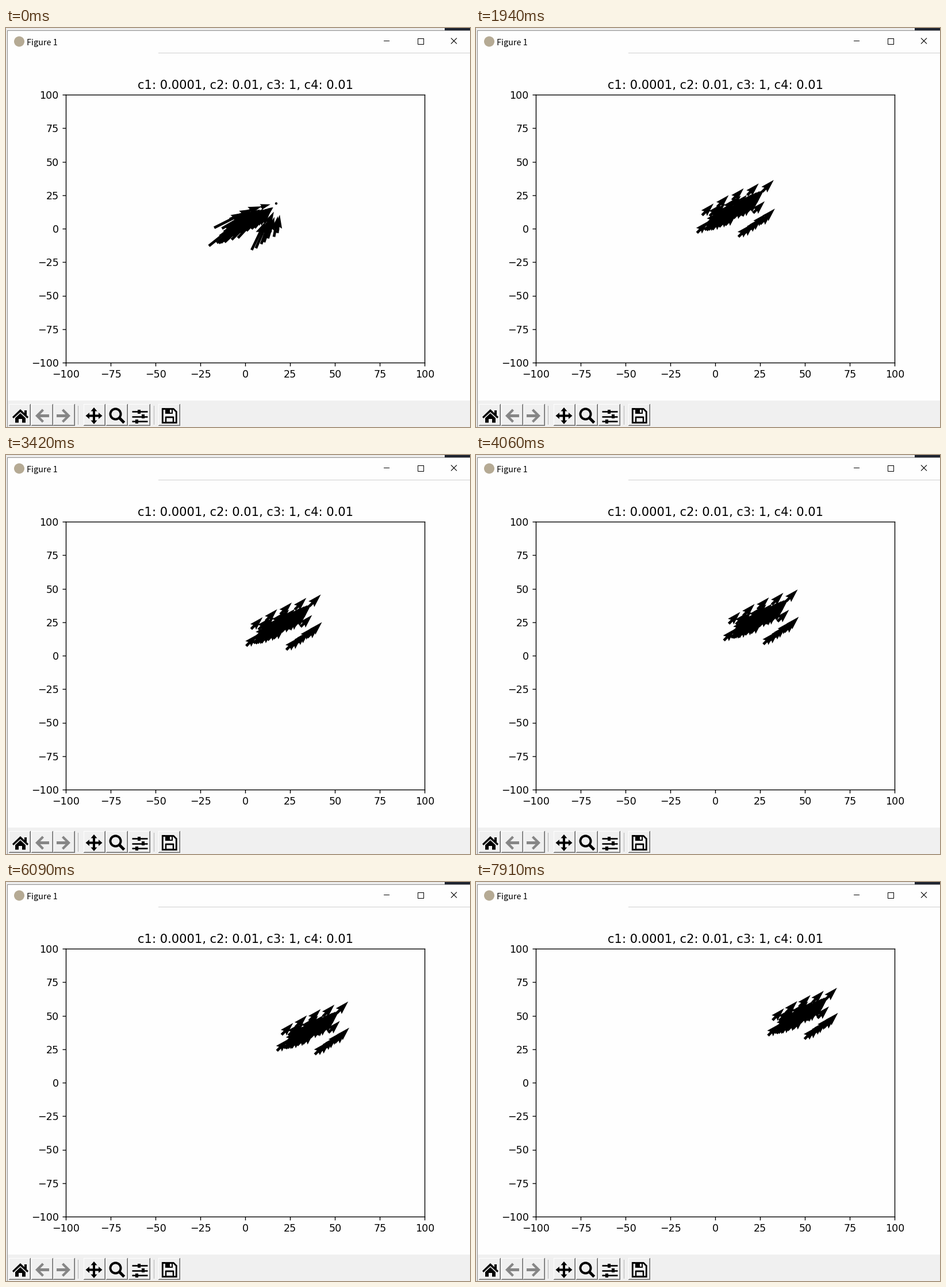
Write a matplotlib script that moves like this. It is 807 by 694 pixels and loops after 8000 ms.

```python
import numpy as np
import matplotlib.pyplot as plt
from matplotlib.animation import FuncAnimation
from matplotlib.patches import Circle, Polygon, Rectangle

W, H, DPI = 807, 694, 128
PT = 72 / DPI            # points per pixel
UI = 126 / DPI           # plot text and line scale
LOOP, INTERVAL = 8000, 50
STEP_MS = 163.5          # time one simulation step stays on screen

plt.rcParams.update({
    "font.family": "DejaVu Sans",
    "font.size": 10 * UI,
    "axes.linewidth": 0.8 * UI,
    "xtick.major.size": 3.5 * UI, "ytick.major.size": 3.5 * UI,
    "xtick.major.width": 0.8 * UI, "ytick.major.width": 0.8 * UI,
    "xtick.major.pad": 3.5 * UI, "ytick.major.pad": 3.5 * UI,
})

fig = plt.figure(figsize=(W / DPI, H / DPI), dpi=DPI, facecolor="#fefefe")
px = fig.add_axes([0, 0, 1, 1])
px.set(xlim=(0, W), ylim=(H, 0), autoscale_on=False)
px.axis("off")


def rect(x0, y0, x1, y1, color):
    px.add_patch(Rectangle((x0, y0), x1 - x0, y1 - y0, fc=color, lw=0))


def poly(points, color="black"):
    px.add_patch(Polygon(points, fc=color, lw=0))


def line(xs, ys, width=1.0, color="black"):
    px.plot(xs, ys, color=color, lw=width * PT, solid_capstyle="butt",
            solid_joinstyle="miter")


def box(x0, y0, x1, y1, width):
    line([x0, x1, x1, x0, x0, x1], [y0, y0, y1, y1, y0, y0], width)


def button(right):
    """Raised tool button that ends at the given x."""
    x0, x1, y0, y1 = right - 38, right, 654, 692
    rect(x0, y0, x1, y1, "#696969")
    rect(x0, y0, x1 - 1, y1 - 1, "#ffffff")
    rect(x0 + 1, y0 + 1, x1 - 1, y1 - 1, "#a0a0a0")
    rect(x0 + 1, y0 + 1, x1 - 2, y1 - 2, "#f0f0f0")


def draw_window():
    rect(0, 0, W, 4, "#ececec")
    rect(763, 0, W, 4, "#1f2430")
    rect(0, 0, 2, H, "#ececec")
    rect(2, 4, W, 5, "#8a8a8a")
    rect(2, 4, 3, H, "#8a8a8a")
    rect(265, 43, W, 44, "#cfcfcf")
    px.add_patch(Circle((23, 23.5), 9, fc="#b5aa94", lw=0))
    px.text(36, 29.5, "Figure 1", family="Noto Sans CJK JP", size=14.4 * PT)
    rect(657, 22, 667, 23, "black")
    box(715.5, 17.5, 725.5, 27.5, 1)
    line([774, 784], [17.5, 27.5], 1.1)
    line([774, 784], [27.5, 17.5], 1.1)


def draw_home(x, y):
    roof = [(0, -12), (14, 1.5), (12, 4), (0, -7)]
    walls = [(0, -5), (9, 3.5), (9, 11.5), (3, 11.5), (3, 5)]
    for half in (np.array(roof), np.array(walls)):
        mirrored = half[::-1] * (-1, 1)
        poly(np.vstack([half, mirrored]) + (x, y))
    rect(x + 6.5, y - 10.5, x + 10.5, y - 2, "black")


def draw_arrow(x, y, side):
    half = np.array([(-12, 0), (0, -12), (3, -9), (-3.5, -2.5), (12, -2.5)])
    shape = np.vstack([half, half[::-1] * (1, -1)])
    poly(shape * (side, 1) + (x, y), "#868686")


def draw_pan(x, y):
    arm = np.array([(2, 2), (2, -8), (5.5, -8), (0, -14.5), (-5.5, -8),
                    (-2, -8), (-2, 2)])
    for _ in range(4):
        poly(arm + (x, y))
        arm = arm[:, ::-1] * (-1, 1)


def draw_zoom(x, y):
    px.add_patch(Circle((x, y), 9, fill=False, ec="black", lw=4 * PT))
    line([x + 6, x + 15], [y + 6, y + 15], 5)


def draw_sliders(x, y):
    for row, knob in enumerate((-1, 6, -5)):
        cx, cy = x + knob, y + 8.5 * (row - 1)
        line([x - 13.5, x + 13.5], [cy, cy], 2.6)
        rect(cx - 3.5, cy - 3.5, cx + 3.5, cy + 3.5, "#f0f0f0")
        rect(cx - 2.5, cy - 3.5, cx + 2.5, cy + 3.5, "black")


def draw_save(x, y):
    line([x - 12, x + 7, x + 12, x + 12, x - 12, x - 12, x - 9],
         [y - 12, y - 12, y - 7, y + 12, y + 12, y - 12, y - 12], 2.8)
    rect(x - 7, y - 12, x + 6, y - 3.5, "black")
    rect(x + 0.5, y - 10.5, x + 3.5, y - 5.5, "#f0f0f0")
    box(x - 6.5, y + 2.5, x + 6.5, y + 11.5, 2.4)


def draw_toolbar():
    rect(3, 648, W, H, "#f0f0f0")
    for right in (43, 82, 120, 173, 212, 251, 303):
        button(right)
    for x in (125, 257):
        rect(x, 657, x + 1, 690, "#b4b4b4")
    draw_home(25, 675)
    draw_arrow(63, 674.5, 1)
    draw_arrow(100, 674.5, -1)
    draw_pan(153, 674.5)
    draw_zoom(190.5, 671.5)
    draw_sliders(232.5, 675.5)
    draw_save(284.3, 674.5)


def draw_plot():
    ax = fig.add_axes([104.2 / W, 1 - 582 / H, 624.2 / W, 466 / H],
                      facecolor="none")
    ticks = np.arange(-100, 101, 25)
    ax.set(xlim=(-100, 100), ylim=(-100, 100), xticks=ticks, yticks=ticks)
    ax.set_title("c1: 0.0001, c2: 0.01, c3: 1, c4: 0.01",
                 fontsize=12 * UI, pad=6 * UI)


def row(a, b, n, bow=0.0):
    """n points from a to b, bent upwards by bow pixels."""
    u = np.linspace(0, 1, n)[:, None]
    return (np.array(a) * (1 - u) + np.array(b) * u
            - np.hstack([0 * u, bow * np.sin(np.pi * u)]))


def make_flock():
    """Arrow tails once all fly the same way; the leader comes first."""
    rng = np.random.default_rng(4)
    top = row((486, 293.5), (380, 335), 5, 6)
    left = row((371, 366), (421, 353), 5)
    right = row((444, 373), (488, 344), 7)
    core = row((388, 337), (470, 306), 48, 4)
    core[:, 1] += rng.uniform(0, 26, len(core))
    jitter = rng.uniform(-2, 2, (12, 2))
    jitter[[0, 5, -1]] = 0
    low = np.vstack([left, right]) + jitter
    return np.vstack([top, low, core])


draw_window()
draw_toolbar()
draw_plot()

home = make_flock()

# Pixels per step: a shared drift with a slow pull together
drift = np.column_stack([3.34 - 0.0032 * (home[:, 0] - 371),
                         -2.17 - 0.0033 * (home[:, 1] - 293)])
HOME_STEP, FIRST_MOVE = 7, 1.6
CRUISE = np.array([20, 20.5])


def tails(step):
    return home + (max(step, FIRST_MOVE) - HOME_STEP) * drift


# At the start all head for the leader, which stands still
start = tails(0)
chase = (start[0] - start) * (0.44, -0.6) + (5, 1)
chase[0] = 0

flock = px.quiver(start[:, 0], start[:, 1], chase[:, 0], chase[:, 1],
                  units="dots", width=4.7, scale_units="dots", scale=1,
                  angles="uv", color="black")


def update(frame):
    step = int((frame * INTERVAL + 54) / STEP_MS)
    mix = 0.3 ** step
    heading = mix * chase + (1 - mix) * CRUISE
    flock.set_offsets(tails(step))
    flock.set_UVC(heading[:, 0], heading[:, 1])
    return flock,


anim = FuncAnimation(fig, update, frames=LOOP // INTERVAL, interval=INTERVAL,
                     repeat=True, repeat_delay=0, blit=False)
plt.show()
```
